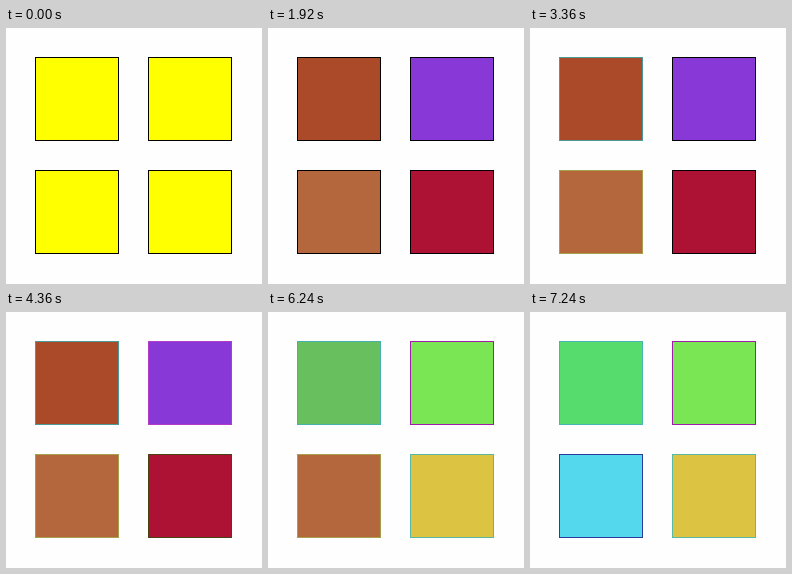
Write an HTML page without scripts that moves like this. It is 256 px wide and 256 px high and loops after 7320 ms.

```html
<!DOCTYPE html>
<html lang="en">
<head>
<meta charset="utf-8">
<title>Four squares</title>
<style>
html, body { margin: 0; width: 100%; height: 100%; overflow: hidden; background: #fefefe; }
svg { display: block; width: 100%; height: 100%; }
rect {
  width: 83px; height: 83px;
  fill: #ff0; stroke: #000; stroke-width: 1;
  animation: 7320ms linear infinite;
}
#top-left { animation-name: top-left; }
#top-right { animation-name: top-right; }
#bottom-left { animation-name: bottom-left; }
#bottom-right { animation-name: bottom-right; }

/* Each square recolours its fill, then its outline, then both. */
@keyframes top-left {
  0%, .55% { fill: #ff0; }
  3.28%, 78.69% { fill: #aa4a28; }
  86.89%, 100% { fill: #56dc6c; }
  0%, 30.6% { stroke: #000; }
  36.07%, 78.69% { stroke: #4a9a9c; }
  86.89%, 100% { stroke: #48b4b4; }
}
@keyframes top-right {
  0%, 6.01% { fill: #ff0; }
  10.93%, 62.3% { fill: #8838d6; }
  68.85%, 100% { fill: #7ae654; }
  0%, 48.63% { stroke: #000; }
  54.1%, 62.3% { stroke: #b03cc8; }
  68.85%, 100% { stroke: #a01ca8; }
}
@keyframes bottom-left {
  0%, 23.5% { fill: #ff0; }
  25.96%, 90.16% { fill: #b4663d; }
  96.99%, 100% { fill: #54d8ee; }
  0%, 38.8% { stroke: #000; }
  45.9%, 90.16% { stroke: #a4a04c; }
  96.99%, 100% { stroke: #2c3c9c; }
}
@keyframes bottom-right {
  0%, 15.85% { fill: #ff0; }
  20.77%, 71.58% { fill: #ad1235; }
  74.32%, 100% { fill: #dcc442; }
  0%, 56.83% { stroke: #000; }
  59.56%, 71.58% { stroke: #4a4414; }
  74.32%, 100% { stroke: #58b8a4; }
}
</style>
</head>
<body>
<svg viewBox="0 0 256 256">
  <rect id="top-left" x="29.5" y="29.5" width="83" height="83"/>
  <rect id="top-right" x="142.5" y="29.5" width="83" height="83"/>
  <rect id="bottom-left" x="29.5" y="142.5" width="83" height="83"/>
  <rect id="bottom-right" x="142.5" y="142.5" width="83" height="83"/>
</svg>
</body>
</html>
```
